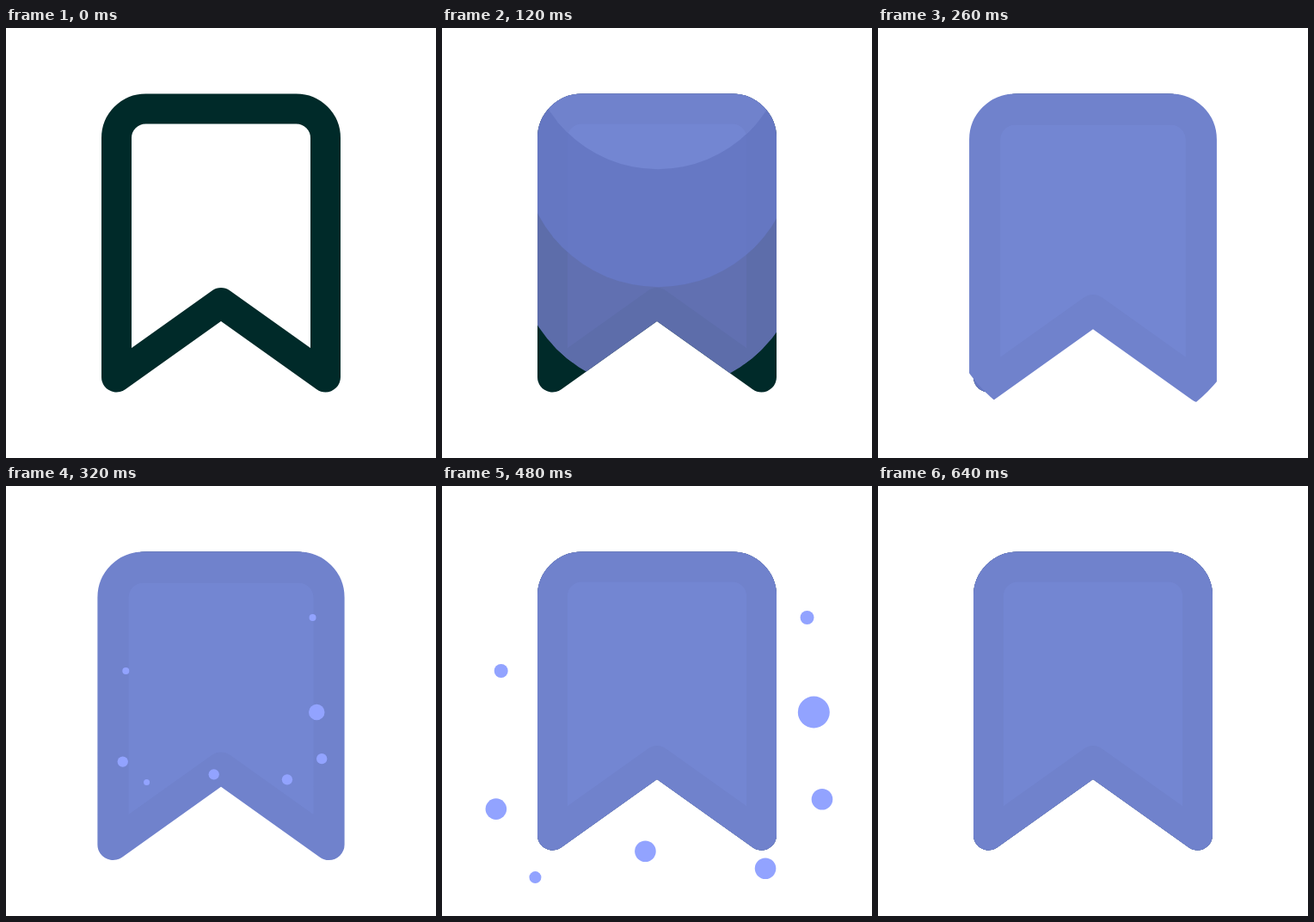
These frames come from a looping animation (500x500 px, 1.14 s). An HTML page with a canvas:

```html
<!DOCTYPE html>
<html lang="en">
<head>
<meta charset="utf-8">
<title>Bookmark</title>
<style>
  html, body { margin: 0; width: 100%; height: 100%; overflow: hidden; background: #fff; }
  canvas { display: block; }
</style>
</head>
<body>
<canvas id="stage" width="500" height="500"></canvas>
<script>
const ctx = document.getElementById('stage').getContext('2d');
const LOOP = 1140, STEP = 20, MID = 250, TOP = 76.5;

const ribbon = new Path2D('M128.5 406V128a34 34 0 0 1 34-34H337.5a34 34 0 0 1 34 34V406L250 319.5Z');

const waves = [
  { delay: 0, fill: '#6170b1', edge: '#5d6daa' },
  { delay: 60, fill: '#6678c4', edge: '#6577c2' },
  { delay: 100, fill: '#7386d2', edge: '#7082cc', swells: true }
];

// Where each dot comes to rest; its start follows from this.
const dots = [
  { x: 63, y: 215, r: 8 },
  { x: 430, y: 153, r: 8 },
  { x: 438, y: 263, r: 18.5 },
  { x: 57, y: 380, r: 12.3 },
  { x: 448, y: 368, r: 12.3 },
  { x: 236, y: 432, r: 12.3 },
  { x: 380, y: 453, r: 12.3 },
  { x: 104, y: 464, r: 7 }
];

const ramp = (t, a, b) => Math.min(1, Math.max(0, (t - a) / (b - a)));
const smooth = k => k * k * (3 - 2 * k);
const easeOut = (k, power) => 1 - (1 - k) ** power;
const mix = (a, b, k) => a + (b - a) * k;

function outline(color) {
  ctx.strokeStyle = color;
  ctx.stroke(ribbon);
}

// Limits drawing to everything above a falling round edge.
function clipWave(age) {
  const x = MID + 0.5 + age / 50;
  const y = -72 + 372 * easeOut(age / 240, 3);
  const r = 147 + 0.185 * age;
  ctx.beginPath();
  ctx.arc(x, y, r, 0, Math.PI);
  ctx.lineTo(x - r, -500);
  ctx.lineTo(x + r, -500);
  ctx.clip();
}

function drawWave({ delay, fill, edge, swells }, t) {
  const age = Math.min(240, t - delay);
  if (age <= 0) return;
  ctx.save();
  if (swells) {
    const scale = 1 + 0.037 * (smooth(ramp(t, 120, 280)) - smooth(ramp(t, 280, 480)));
    ctx.translate(MID, TOP);
    ctx.scale(scale, scale);
    ctx.translate(-MID, -TOP);
  }
  clipWave(age);
  ctx.fillStyle = fill;
  ctx.fill(ribbon);
  outline(edge);
  ctx.restore();
}

function drawDots(t) {
  const go = easeOut(ramp(t, 280, 540), 2);
  const grow = ramp(t, 280, 360);
  ctx.save();
  ctx.globalAlpha = 1 - ramp(t, 540, 640);
  ctx.fillStyle = '#92a3ff';
  for (const { x, y, r } of dots) {
    ctx.beginPath();
    ctx.arc(mix(mix(MID, x, 0.43), x, go), mix(Math.min(y, 297), y, go), r * grow, 0, Math.PI * 2);
    ctx.fill();
  }
  ctx.restore();
}

function draw(t) {
  ctx.clearRect(0, 0, 500, 500);
  outline('#002a29');
  for (const wave of waves) drawWave(wave, t);
  drawDots(t);
}

ctx.lineWidth = 35;
ctx.lineJoin = 'round';
const start = performance.now();
function tick() {
  const t = (performance.now() - start) % LOOP;
  draw(Math.floor(t / STEP) * STEP);
  requestAnimationFrame(tick);
}
tick();
</script>
</body>
</html>
```
